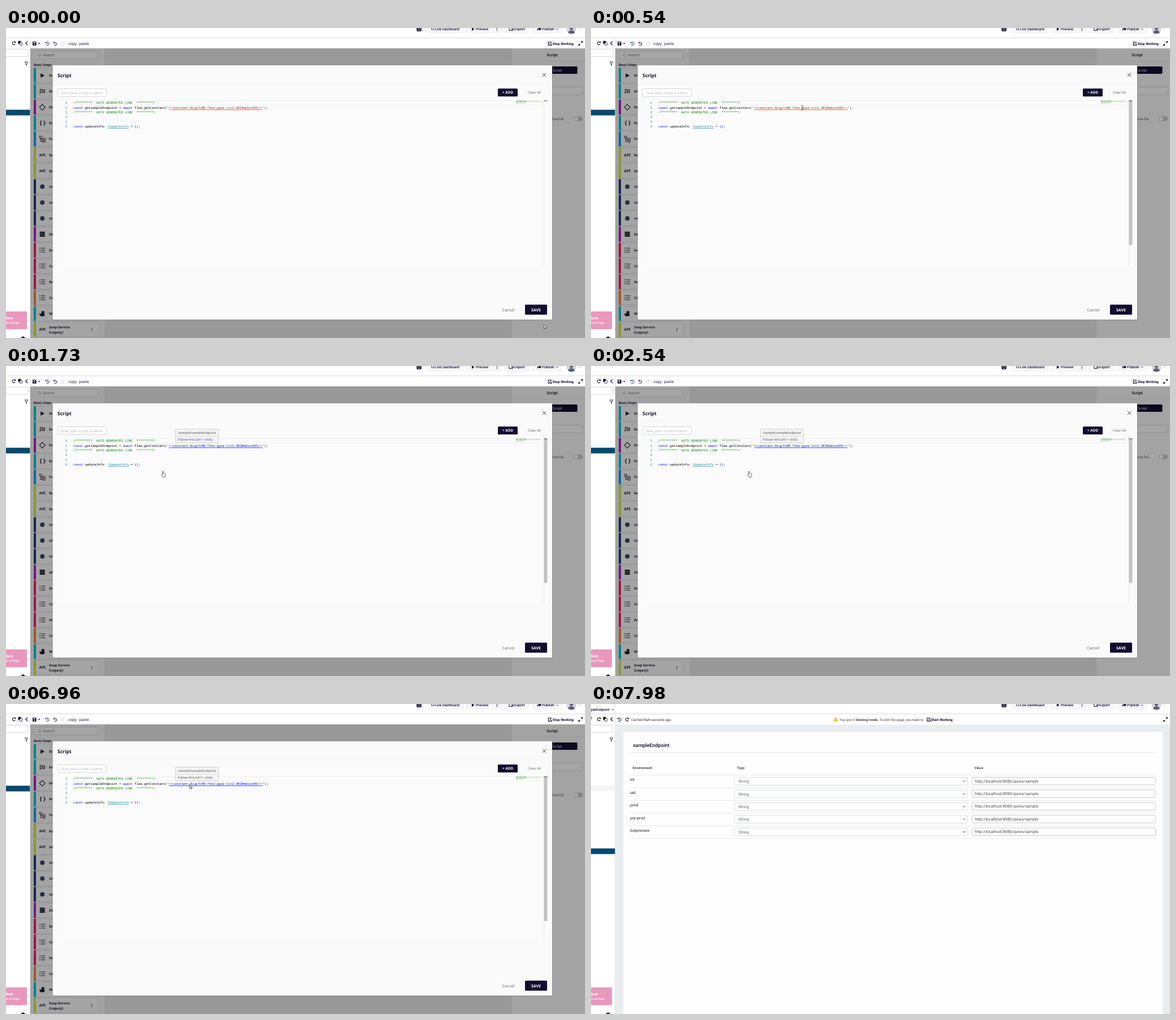
An HTML page for the animation above (8 s loop, 1023 by 548 pixels).

```html
<!DOCTYPE html>
<html lang="en">
<head>
<meta charset="utf-8">
<title>Script constant lookup</title>
<style>
  html, body { margin: 0; width: 100%; height: 100%; overflow: hidden; background: #fff; }
  svg { display: block; width: 1023px; height: 548px; }
  text { white-space: pre; text-rendering: geometricPrecision; }
  .noto { font-family: "Noto Sans", "Open Sans", sans-serif; }
  .robo { font-family: Roboto, Inter, sans-serif; }
  .mono { font-family: "Noto Sans Mono", "DejaVu Sans Mono", monospace; font-size: 5.63px; }
</style>
</head>
<body>
<svg id="stage" viewBox="0 0 1023 548"></svg>
<script>
const NS = "http://www.w3.org/2000/svg";
const stage = document.getElementById("stage");
const INK = "#120c2e";

function el(parent, tag, attrs = {}, text) {
  const node = document.createElementNS(NS, tag);
  for (const key in attrs) node.setAttribute(key, attrs[key]);
  if (text !== undefined) node.textContent = text;
  parent.appendChild(node);
  return node;
}
const group = (parent, attrs) => el(parent, "g", attrs);
const rect = (p, x, y, width, height, fill, more) =>
  el(p, "rect", { x, y, width, height, fill, ...more });
const box = (p, x, y, w, h, fill, stroke, rx = 1.5) =>
  rect(p, x, y, w, h, fill, { stroke, rx, "stroke-width": 0.8 });
const line = (p, d, stroke, width = 1, more) =>
  el(p, "path", { d, stroke, fill: "none", "stroke-width": width, ...more });
const shape = (p, d, fill, more) => el(p, "path", { d, fill, ...more });
const label = (p, face, x, y, size, fill, text, weight = 400) =>
  el(p, "text", { class: face, x, y, "font-size": size, fill, "font-weight": weight }, text);
const at = (p, x, y) => group(p, { transform: `translate(${x} ${y})` });

function spans(p, attrs, parts) {
  const t = el(p, "text", attrs);
  for (const [text, more] of parts) el(t, "tspan", more, text);
  return t;
}

function clockIcon(p, x, y, c) {
  const g = at(p, x, y);
  line(g, "M-2.7-1.4A3.1 3.1 0 1 1-2.6 1.8M-3.3-2.9V-1.1H-1.4M0-1.8V.2L1.3 1", c, 0.9);
}
function reloadIcon(p, x, y, c) {
  line(at(p, x, y), "M2.3 1.3A2.7 2.7 0 1 1 2-1.8M2.7-3V-1.2H.8", c, 1.1);
}
function shareIcon(p, x, y) {
  shape(at(p, x, y), "M-4 2.6Q-3.6-1.4 .5-1.5V-3.3L4.2-.2.5 2.7V.9Q-2.4.6-4 2.6Z", INK);
}
function penBox(p, x, y) {
  line(at(p, x, y), "M1-2.6H-3V3H2.7V.6M-.8 1L3-2.8", INK, 1.1);
}
function dots(p, x, y, c) {
  for (const d of [-2, 0, 2]) el(p, "circle", { cx: x, cy: y + d, r: 0.7, fill: c });
}

// Shared page frame: top bar and left strip
function drawFrame(p) {
  rect(p, 0, 0, 1023, 548, "#fff");
  rect(p, 0, 17, 1023, 0.9, "#d4d4d8");
  for (const [x, w] of [[743, 65], [813, 62], [880, 44], [930, 52]])
    box(p, x, -8, w, 17, "#f7f7f8", "#ececf0");
  rect(p, 725.5, -2, 8.5, 8, INK, { rx: 2 });
  for (const x of [728.2, 731.5]) el(p, "circle", { cx: x, cy: 1.6, r: 0.9, fill: "#fff" });
  rect(p, 728, 4, 4, 0.8, "#fff");
  box(p, 752, -2, 4, 5, "none", INK, 0);
  shape(p, "M823-1L827.5 2 823 5Z", INK);
  dots(p, 867.5, 2.5, INK);
  shareIcon(p, 942, 2);
  line(p, "M889 0V4.5H895V2.5M892 2H896.5M895 .3L896.8 2 895 3.7", INK, 1);
  line(p, "M972 1.5L973.7 3.2 975.4 1.5", INK, 0.9);
  const top = (x, size, s) => label(p, "robo", x, 4.4, size, INK, s, 500);
  top(758, 6.24, "Live Dashboard");
  top(830, 6.3, "Preview");
  top(898, 6.5, "Export");
  top(947, 6.5, "Publish");
  el(p, "circle", { cx: 999, cy: 2, r: 8.5, fill: "#d5d5dc" });
  shape(p, "M993 8.5Q994 4 999 4T1005 8.5Q999 12 993 8.5Z", "#5a6078");
  el(p, "circle", { cx: 999, cy: 0.5, r: 3, fill: "#5a6078" });
  line(p, "M1011.5 1.7L1013 3.2 1014.5 1.7", "#999", 0.8);
  line(p, "M1015.8 26.2L1018.3 23.8M1016.2 23.8H1018.4V26M1014.3 28.2L1011.8 30.7M1011.8 28.5V30.7H1014", INK, 1.1);

  reloadIcon(p, 14, 27, INK);
  box(p, 21.8, 23.2, 4.3, 4.6, INK, INK, 0.5);
  box(p, 24.2, 25.7, 4.3, 4.6, "#fff", INK, 0.5);
  line(p, "M38 23.7L34.8 27 38 30.3", INK, 1.2);
  box(p, -4, 37.4, 43, 13, "#fff", "#c8c8ce");
  shape(p, "M33.2 60H38.8L36.7 63V66L35.3 65V63Z", "#fff", { stroke: INK, "stroke-width": 0.8 });
  rect(p, 0, 501, 37, 31.5, "#ea97bd", { rx: 1.5 });
  label(p, "robo", 0, 515, 6.9, "#fff", "ture", 700);
  label(p, "robo", 0, 522.7, 5.1, "#fff", "to UI Page", 500);
  shape(p, "M26 548Q27 546 30 546T34.5 548ZM29.4 545H31V547H29.4Z", INK);
  rect(p, 42.4, 17, 0.8, 531, "#d8d8dc");
}

const ICON = "#17131f";
const icons = {
  play: g => shape(g, "M-3-3.8L4 0-3 3.8Z", ICON),
  flag: g => {
    line(g, "M-3.8-4V4.5M-3.8-3.3Q-1.5-4.4.3-3T4.3-3.2V2Q2.2 3 .3 1.9T-3.8 1.8", ICON, 1);
    rect(g, -1.5, -2.6, 2, 2, ICON);
    rect(g, 0.5, -0.6, 2, 2, ICON);
  },
  diamond: g => line(g, "M0-5L5 0 0 5-5 0Z", ICON, 1.1),
  braces: g => label(g, "noto", -4.8, 3.1, 10, ICON, "{ }", 600),
  tree: g => {
    for (const [x, y] of [[-5, -5], [1, -1.3], [1, 2.8]]) box(g, x, y, 4, 3, "none", ICON, 0);
    line(g, "M-3-2V4.2H1M-3 .2H1", ICON, 1);
  },
  api: g => label(g, "noto", -5.6, 2.4, 6.6, ICON, "API", 700),
  cloud: g => el(g, "circle", { r: 4, fill: "#243040" }),
  disk: g => {
    for (const y of [-3.2, 0, 3.2]) rect(g, -4.8, y - 1.5, 9.6, 2.7, ICON, { rx: 1.4 });
  },
  list: g => {
    for (const y of [-3.5, 0, 3.5]) {
      rect(g, -5, y - 0.7, 1.5, 1.4, ICON);
      rect(g, -2.2, y - 0.5, 7.2, 1, ICON);
    }
  },
  duck: g => shape(g, "M-1-4Q1-6 3-3.5L5-2.6 3-1.7Q2.4-.8 4 .5 5.5 5-1 4.8-5.5 4.5-5-1-3 1-1.4-1-2-2.5-1-4Z", ICON)
};
const TEAL = "#078089", PLUM = "#74187f", OLIVE = "#89962c", NAVY = "#13294b", ROSE = "#9c1646";
const steps = [
  [TEAL, "play", "Start"], [TEAL, "flag", "End"], [PLUM, "diamond", "Decision"],
  [TEAL, "braces", "Script"], ["#0a68a0", "tree", "Function"], [OLIVE, "api", "Rest"],
  [OLIVE, "api", "Soap"], [NAVY, "cloud", "V4"], [NAVY, "cloud", "V4"], [NAVY, "cloud", "V4"],
  [PLUM, "disk", "DB"], [ROSE, "list", "Set"], [ROSE, "list", "Copy"], [ROSE, "list", "Add"],
  ["#a3552d", "list", "Count"], [TEAL, "duck", "Wait"], [OLIVE, "api", ""]
];

function drawBackdrop(p) {
  rect(p, 43, 36, 980, 512, "#999");
  rect(p, 43, 36, 131, 512, "#a1a1a1");
  rect(p, 892.5, 36, 131, 512, "#a3a3a3");
  rect(p, 892, 36, 0.8, 512, "#909090");
  rect(p, 893, 58.5, 130, 0.7, "#949494");
  box(p, 49.5, 41, 113, 13.5, "#a5a5a5", "#8e8e8e");
  line(p, "M60.3 49.5L62 51.3M61 47.5A2.3 2.3 0 1 1 56.4 47.5 2.3 2.3 0 1 1 61 47.5", "#66666a", 0.7);
  label(p, "noto", 65, 50.3, 6.58, "#4c4c50", "Search");
  label(p, "noto", 49, 67, 5.65, ICON, "Basic Steps", 600);
  steps.forEach(([color, icon, name], i) => {
    const y = 84 + i * 28.06;
    box(p, 49.5, y - 13, 113, 26, "#a4a4a4", "#949494", 1);
    rect(p, 49, y - 13.2, 4, 26.4, color);
    icons[icon](at(p, 64.2, y));
    label(p, "noto", 76, y + 2.2, 6, ICON, name, 700);
  });
  label(p, "noto", 76, 531, 5.95, ICON, "Soap Service", 700);
  label(p, "noto", 76, 540, 6, ICON, "(Legacy)", 700);
  dots(p, 151.5, 533, ICON);

  label(p, "noto", 955.5, 50, 6.75, ICON, "Script", 700);
  rect(p, 900, 68, 109.5, 13, "#0c0820", { rx: 1.5 });
  label(p, "noto", 966, 76.7, 6.1, "#a8a8a8", "Script", 500);
  box(p, 900, 104.5, 119, 13.5, "#a5a5a5", "#8c8c8c");
  label(p, "noto", 965.3, 162.6, 6.2, "#3d3d42", "low.fail");
  rect(p, 1003, 156.4, 16, 8.2, "#858585", { rx: 4.1 });
  el(p, "circle", { cx: 1007.3, cy: 160.5, r: 3.3, fill: "#a8a8a8" });
}

function drawToolbar(p) {
  shape(p, "M47 24H52.2L53.5 25.3V31H47Z", INK);
  rect(p, 48.3, 24.9, 3.2, 1.8, "#fff");
  el(p, "circle", { cx: 50.2, cy: 29, r: 1, fill: "#fff" });
  shape(p, "M56.8 26.5H60.6L58.7 28.7Z", INK);
  clockIcon(p, 73, 27.5, "#1c2f6b");
  line(p, "M85.6 24.2L83.8 26 85.6 27.8M84 26H87.5A2.2 2.2 0 0 1 87.5 30.4H85", INK, 1);
  line(p, "M101.4 24.2L103.2 26 101.4 27.8M103 26H99.5A2.2 2.2 0 0 0 99.5 30.4H102", "#d2d2d6", 1);
  label(p, "noto", 110, 30, 6.8, INK, "copy");
  label(p, "noto", 129, 30, 6.8, INK, "paste");
  penBox(p, 961.3, 27.4);
  label(p, "robo", 965.8, 29.8, 6.15, INK, "Stop Working", 700);
}

const CODE_X = 119, PITCH = 8.33, CHAR = 3.378;
const blue = { fill: "#0000ff" };
let link, linkBar, scrollbar, tooltip;

function drawModal(p) {
  rect(p, 81.2, 66, 885, 451, "#000", { opacity: 0.12, rx: 2 });
  rect(p, 82.5, 66, 882.5, 449.5, "#fafafa", { rx: 1.5 });
  label(p, "noto", 91, 86.7, 8.5, INK, "Script", 600);
  line(p, "M947.8 79.8L954.2 86.2M954.2 79.8L947.8 86.2", "#333", 0.9);
  rect(p, 82.5, 97.5, 882.5, 0.6, "#f3f3f3");
  box(p, 91.4, 107.4, 86, 13.5, "#fff", "#c9c9c9");
  label(p, "noto", 97, 116.6, 6.58, "#b5b5b8", "Give your script a name");
  rect(p, 869, 107, 35, 14, INK, { rx: 1.5 });
  label(p, "noto", 877, 116.3, 6.4, "#fff", "+ ADD", 600);
  label(p, "noto", 922, 116.3, 6.05, "#66666c", "Clear All");
  label(p, "noto", 876.5, 500.5, 7.02, "#66666c", "Cancel");
  rect(p, 917, 489, 39, 17.8, INK, { rx: 1.5 });
  label(p, "noto", 928, 500.6, 7, "#fff", "SAVE", 600);

  rect(p, 91, 128, 865.5, 292, "#fbfbfb");
  box(p, 119, 128.4, 831, 7.8, "none", "#ebebeb", 0);
  for (let i = 0; i < 6; i++)
    el(p, "text", { class: "mono", x: 108, y: 134.4 + i * PITCH, fill: i ? "#2f86a5" : "#0b5a80", "text-anchor": "end" }, i + 1);

  const row = (i, parts) => spans(p, { class: "mono", x: CODE_X, y: 134.4 + i * PITCH, fill: "#000" }, parts);
  const banner = "/*********  AUTO GENERATED LINE  *********/";
  const green = { fill: "#008000" }, red = { fill: "#b01515" };
  row(0, [[banner, green]]);
  const call = row(1, [
    ["const", blue], [" getsampleEndpoint = ", {}], ["await", blue], [" flow.getConstant(", {}],
    ['"', red], ["<<constant:8cup7c08-7tke-gqxa-1ct2-30l0mdsro991>>", red], ['"', red], [");", {}]
  ]);
  link = call.children[5];
  linkBar = rect(p, CODE_X + 50 * CHAR, 144, 49 * CHAR, 0.7, "#d33");
  row(2, [[banner, green]]);
  row(5, [["const", blue], [" updateInfo: ", {}], ["IUpdateInfo", { fill: "#2392a0" }], [" = ", {}], ["{}", blue], [";", {}]]);
  rect(p, CODE_X + 18 * CHAR, 177.4, 11 * CHAR, 0.7, "#2392a0");

  const mini = (y, x1, x2, c) => line(p, `M${x1} ${y}H${x2}`, c, 0.8, { "stroke-dasharray": "4 .7 2 .5" });
  mini(128.8, 901, 919.5, "#5cae5c");
  mini(129.9, 901, 945, "#8fbf8f");
  mini(131, 901, 919.5, "#5cae5c");
  mini(133.2, 901, 915, "#9cc6b4");
  rect(p, 950.2, 128, 0.7, 292, "#dcdcdc");
  scrollbar = rect(p, 950.4, 129, 6.1, 254.5, "#c3c3c3");
  rect(p, 950.5, 128.2, 6, 1, "#444");

  tooltip = group(p);
  box(tooltip, 299.7, 111.7, 75.6, 24.2, "#f4f4f4", "#c8c8c8", 0);
  rect(tooltip, 300, 123.8, 75, 0.7, "#d0d0d0");
  label(tooltip, "noto", 303.5, 120.3, 5.72, "#555", "/sample/sampleEndpoint");
  label(tooltip, "noto", 303.5, 132, 5.9, "#555", "Follow link (ctrl + click)");
}

function drawEndpoint(p) {
  label(p, "robo", 0, 12, 6.14, INK, "pleEndpoint", 500);
  line(p, "M37 8.3L40.4 11.7M40.4 8.3L37 11.7", "#444", 0.8);
  rect(p, 42.4, 0, 0.8, 17, "#d8d8dc");
  rect(p, 0, 144, 42.4, 10, "#f5f5f5");
  rect(p, 0, 255.3, 42.4, 10, "#05496f");
  clockIcon(p, 50, 27.5, INK);
  reloadIcon(p, 64, 27.5, INK);
  label(p, "robo", 71, 29.8, 6.15, "#333", "Cached NaN seconds ago");
  shape(p, "M432.3 23.3L436.3 30.3H428.3Z", "#f0b43c", { stroke: "#f0b43c", "stroke-width": 0.6, "stroke-linejoin": "round" });
  rect(p, 431.9, 25.5, 0.8, 2.5, "#fff");
  rect(p, 431.9, 28.6, 0.8, 0.8, "#fff");
  spans(p, { class: "robo", x: 439, y: 29.8, "font-size": 6.14, fill: "#444" },
    [["You are in ", {}], ["Viewing mode", { "font-weight": 700 }], [". To edit the page, you need to", {}]]);
  penBox(p, 597, 27.4);
  label(p, "robo", 600.8, 29.8, 6.17, INK, "Start Working", 700);

  rect(p, 43.2, 36.5, 980, 512, "#e9edf0");
  rect(p, 57, 49, 953, 500, "#fefefe", { rx: 1.5 });
  label(p, "robo", 74.3, 76.3, 8.85, INK, "sampleEndpoint", 500);
  const rule = y => rect(p, 67, y, 932, 0.8, "#e4e4e7");
  rule(85.3);
  rule(125.2);
  for (const [x, s] of [[73.5, "Environment"], [258, "Type"], [677.5, "Value"]])
    label(p, "robo", x, 114.6, 6.16, "#333", s, 500);
  ["int", "uat", "prod", "pre-prod", "livepreview"].forEach((name, i) => {
    const y = 136.3 + i * 22.4;
    label(p, "robo", 69, y, 7.02, "#222", name);
    box(p, 253.4, y - 6.6, 412, 13.6, "#fff", "#cfd3d8");
    label(p, "robo", 260.5, y + 2.8, 7.02, "#62666e", "String");
    line(p, `M657.2 ${y - 0.8}l2 2 2-2`, "#333", 1);
    box(p, 673.4, y - 6.8, 324, 13.4, "#fff", "#bcbcc0");
    label(p, "robo", 678.3, y + 2.3, 7.02, "#4a4a4e", "http://localhost:8080/jaxws/sample");
    rule(y + 11.4);
  });
}

function drawCursors(p) {
  const arrow = group(p), beam = group(p), hand = group(p);
  shape(arrow, "M0 0V6.6L1.6 5.2 2.7 7.8 3.8 7.3 2.7 4.8H4.8Z", "#fff", { stroke: "#222", "stroke-width": 0.7 });
  line(beam, "M-1.5-4H-.3L0-3.7.3-4H1.5M0-3.7V3.7M-1.5 4H-.3L0 3.7.3 4H1.5", "#222", 0.7);
  shape(hand, "M-.8 6.5V.6Q0-.5.8.6V3.8Q2-.1+3 2.5 3 4.3 3.6 3 4.6 3.4 4.9 4 4.9 5.3V7.6Q4.6 9 4 10.3H-.2Q-1-.1+8.5 8.5L-2 6.6Q-1.9 5.2-.8 6.5Z"
    .replace("Q2-.1+3 2.5 3 4.3 3.6 3 4.6 3.4 4.9 4 4.9 5.3", "Q2 2.8 2.4 4 3.5 3.2 3.8 4.4 4.9 3.8 4.9 5.3")
    .replace("Q-1-.1+8.5 8.5L-2 6.6", "Q-1.2 8.6-2.2 7"), "#fff", { stroke: "#222", "stroke-width": 0.7 });
  return { arrow, beam, hand };
}

drawFrame(stage);
const editor = group(stage), endpoint = group(stage);
rect(editor, 0, 144.5, 42.4, 10, "#05496f");
drawToolbar(editor);
drawBackdrop(editor);
drawModal(editor);
drawEndpoint(endpoint);
const cursors = drawCursors(stage);

// Pointer runs: start, end, one tip position per step
const runs = [
  [70, 540, [[903, 505], [709, 414], [540, 288], [420, 190], [345, 147], [318, 134], [352, 139], [373, 141]]],
  [1400, 1730, [[380, 143], [386.5, 145], [372, 155], [339.5, 171], [300, 182], [277, 186]]],
  [2470, 3020, [[277, 187], [279, 186], [286, 178.5], [292, 175], [300, 170], [307.5, 165], [315, 158], [321, 152.5], [324.5, 142.5]]],
  [7550, 7980, [[315, 146], [270, 135], [200, 117], [125, 94], [60, 60], [20, 36], [-3, 19.5]]]
];

function pointerAt(t) {
  let spot = [950.5, 524.5];
  for (const [from, to, path] of runs) {
    if (t < from) break;
    const i = Math.floor((t - from) / (to - from) * (path.length - 1) + 1e-6);
    spot = path[Math.min(i, path.length - 1)];
  }
  return spot;
}

const show = (node, on) => node.setAttribute("visibility", on ? "visible" : "hidden");

function render(t) {
  const [x, y] = pointerAt(t);
  const inEditor = t < 6960 && y < 420;
  const hovering = t >= 1150;
  const kind = !inEditor ? "arrow" : hovering ? "hand" : "beam";
  for (const name in cursors) {
    show(cursors[name], name === kind);
    cursors[name].setAttribute("transform", `translate(${x} ${y})`);
  }
  show(editor, t < 7030);
  show(endpoint, t >= 7030);
  scrollbar.setAttribute("opacity", y < 420 ? 1 : 0);
  const fade = t < 870 ? 0 : Math.min(1, (Math.floor((t - 870) / 93.3) + 1) / 3);
  tooltip.setAttribute("opacity", fade);
  link.setAttribute("fill", hovering ? "#0000ff" : "#b01515");
  linkBar.setAttribute("fill", hovering ? "#0000ff" : "#d33");
}

const start = performance.now();
function tick() {
  render((performance.now() - start) % 8000);
  requestAnimationFrame(tick);
}
tick();
</script>
</body>
</html>
```
